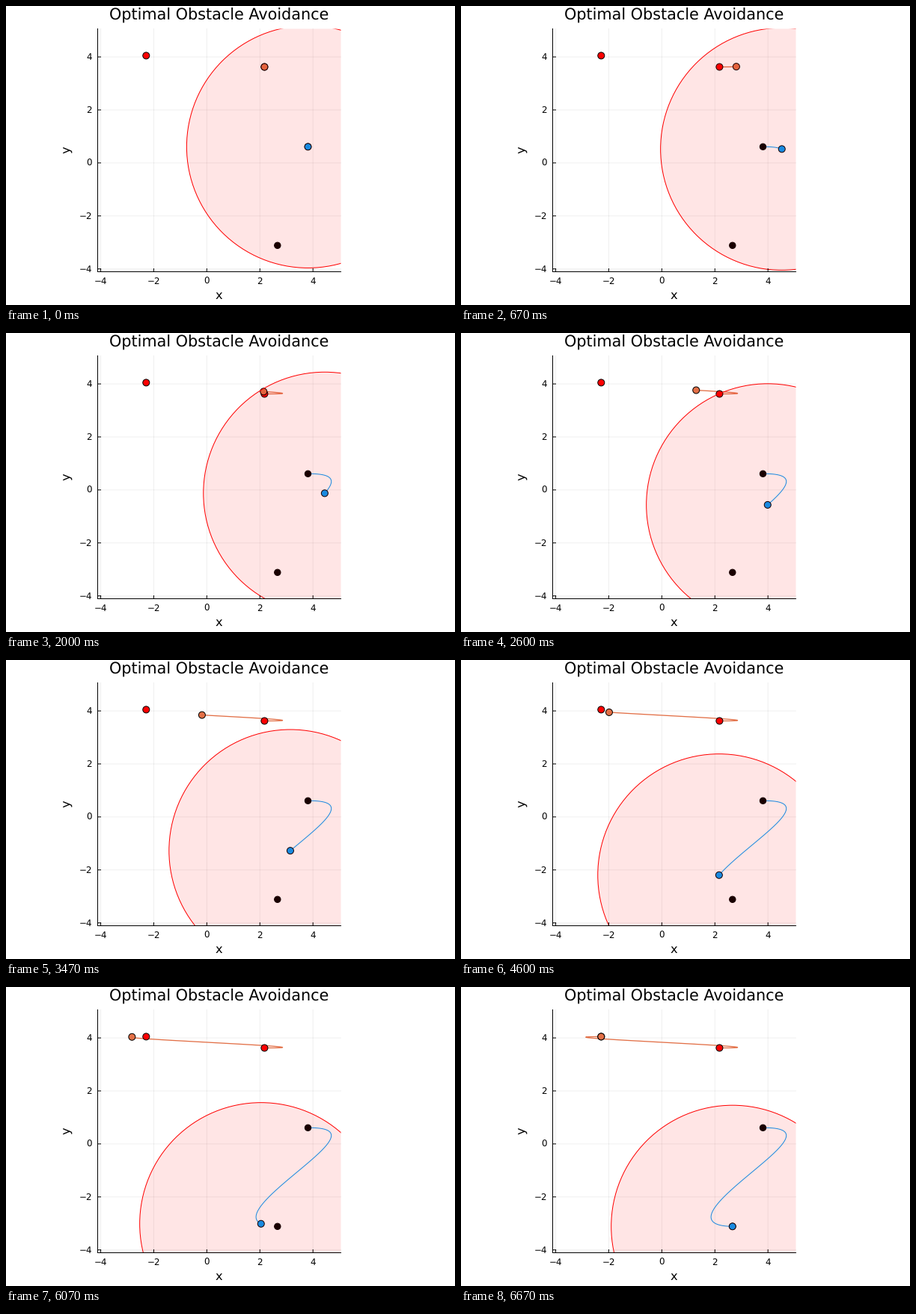
A matplotlib script that plays this animation: 600x400 px, repeating every 6740 ms.

```python
import numpy as np
import matplotlib.pyplot as plt
from matplotlib.animation import FuncAnimation
from matplotlib.patches import Circle, Polygon

W, H, DPI = 600, 400, 100
PX = 72 / DPI                      # one pixel in points
STEPS, LOOP, TICK = 100, 6740, 20
LEFT, RIGHT, TOP, BOTTOM = 122.5, 447.5, 30.5, 355.5
UNIT, X0, Y0 = 35.45, 268.4, 209.9
RADIUS = 162.1
BLUE, ORANGE = "#009AFA", "#E26F46"

plt.rcParams["font.family"] = "DejaVu Sans"
plt.rcParams["text.hinting"] = "none"
plt.rcParams["path.snap"] = False

fig = plt.figure(figsize=(W / DPI, H / DPI), dpi=DPI, facecolor="white")
ax = fig.add_axes([0, 0, 1, 1])
ax.set_xlim(0, W)
ax.set_ylim(H, 0)
ax.axis("off")


def cubic(p0, p1, v):
    """Least-effort path between two states, integrated with Euler steps."""
    s = np.arange(STEPS + 1) / STEPS
    ease = s * s * (3 - 2 * s)
    shift = 6 * ((p1 - p0) - v) / (2 * STEPS)
    va, vb = v - shift, v + shift
    return p0 + (p1 - p0) * ease + va * s * (1 - s) ** 2 - vb * s * s * (1 - s)


def pull(gain):
    s = np.arange(STEPS + 1) / STEPS
    return -(gain - 10 * (s - 0.5)) * (s * (1 - s)) ** 2


def line(xs, ys, color="black", width=1.0, **kw):
    return ax.plot(xs, ys, color=color, lw=width * PX, **kw)[0]


def dot(x, y, color, z, r=4.5):
    return ax.add_patch(Circle((x, y), r, fc=color, ec="black", lw=PX, zorder=z))


def label(x, y, text, size, **kw):
    ax.text(x, y, text, fontsize=size * PX, va="baseline", **kw)


# axes
for v in range(-4, 5, 2):
    gx, gy = X0 + UNIT * v, Y0 - UNIT * v
    name = str(v).replace("-", "\u2212")
    line([gx, gx], [TOP, BOTTOM], alpha=0.06, zorder=1)
    line([LEFT, RIGHT], [gy, gy], alpha=0.06, zorder=1)
    line([gx, gx], [BOTTOM, BOTTOM - 4], zorder=8)
    line([LEFT, LEFT + 4], [gy, gy], zorder=8)
    label(gx, 371.5, name, 11.9, ha="center")
    label(115, gy + 4.4, name, 11.9, ha="right")
line([LEFT, LEFT], [TOP, BOTTOM], zorder=8)
line([LEFT, RIGHT], [BOTTOM, BOTTOM], zorder=8)

label(285, 19, "Optimal Obstacle Avoidance", 20.8, ha="center")
label(284.5, 391.5, "x", 16.3, ha="center")
label(86, 192, "y", 16.3, ha="center", rotation=90, rotation_mode="anchor")

# paths: both bodies start and end moving right at one unit per second
SPEED = 10 * UNIT
blue_x = cubic(403.5, 362.8, SPEED) + pull(23)
blue_y = cubic(188.3, 320.3, 0) + pull(34.5)
orange_x = cubic(345.4, 187.3, SPEED)
orange_y = cubic(81.5, 66.4, 0)

blue_trail = line([], [], BLUE, zorder=2)
orange_trail = line([], [], ORANGE, 1.3, zorder=2)

for i in (0, STEPS):
    dot(blue_x[i], blue_y[i], "black", 3, 4.2)
    dot(orange_x[i], orange_y[i], "red", 3)

blue_dot = dot(blue_x[0], blue_y[0], BLUE, 4)
orange_dot = dot(orange_x[0], orange_y[0], ORANGE, 4)

window = Polygon([(LEFT, TOP), (RIGHT, TOP), (RIGHT, BOTTOM), (LEFT, BOTTOM)],
                 transform=ax.transData)
zone = Circle((0, 0), RADIUS, fc=(1, 0, 0, 0.1), ec="red", lw=PX, zorder=6)
ax.add_patch(zone)
zone.set_clip_path(window)


def draw(tick):
    # 15 steps a second, each falling due within its tick
    k = min((tick * TICK + 15) * 15 // 1000, STEPS)
    blue_trail.set_data(blue_x[:k + 1], blue_y[:k + 1])
    orange_trail.set_data(orange_x[:k + 1], orange_y[:k + 1])
    blue_dot.center = zone.center = blue_x[k], blue_y[k]
    orange_dot.center = orange_x[k], orange_y[k]
    return blue_trail, orange_trail, blue_dot, orange_dot, zone


anim = FuncAnimation(fig, draw, frames=LOOP // TICK, interval=TICK,
                     repeat=True, repeat_delay=0, blit=False)
plt.show()
```
